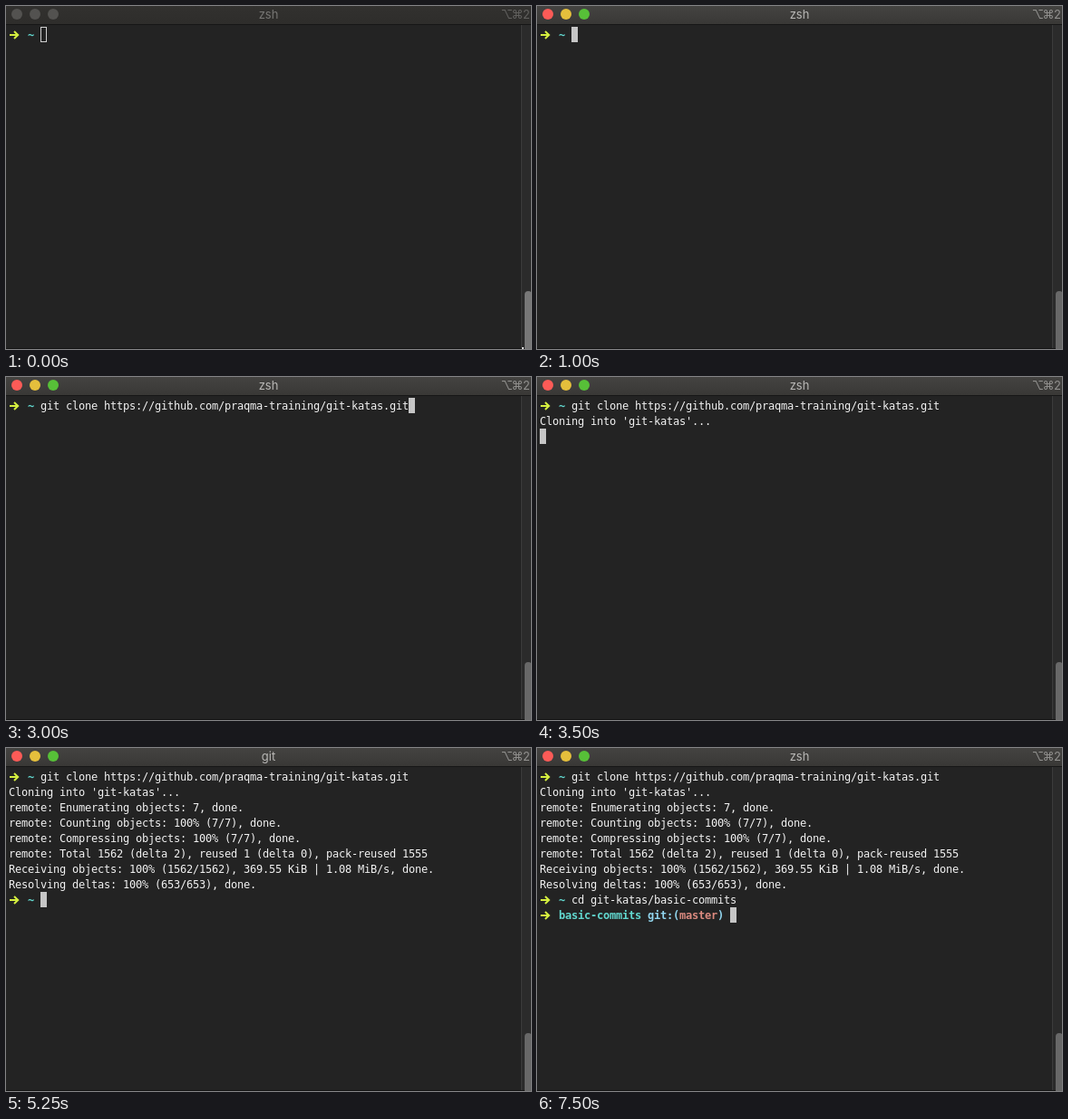
An HTML page with a canvas that plays this animation: 579 by 379 pixels, repeating every 8 s.

```html
<!DOCTYPE html>
<html lang="en">
<head>
<meta charset="utf-8">
<title>Terminal</title>
<style>
html, body { margin: 0; width: 579px; height: 379px; overflow: hidden; background: #232323; }
canvas { display: block; }
</style>
</head>
<body>
<canvas id="stage" width="579" height="379"></canvas>
<script>
const ctx = document.getElementById('stage').getContext('2d');
const LOOP = 8000, CELL = 7, ROW = 17, LEFT = 3, TOP = 23;
const BG = '#232323', TEXT = '#f2f2f2', CYAN = '#62d9d0', BLUE = '#91d5ee', RED = '#dc8b80', LIME = '#d5ef3f';
const MONO = '"DejaVu Sans Mono", monospace';
const SANS = 'Inter, "DejaVu Sans", sans-serif';

// [time, characters typed so far]
const clone = 'git clone https://github.com/praqma-training/git-katas.git';
const cloneKeys = [[1500, 1], [1750, 3], [2000, 4], [2500, 5], [3000, clone.length]];
const cd = 'cd git-katas/basic-commits';
const cdKeys = [[6000, 2], [6250, 3], [6500, 5], [7000, cd.length]];

// [time, row, text]; a later entry replaces the same row
const output = [
  [3500, 1, "Cloning into 'git-katas'..."],
  [4750, 2, 'remote: Enumerating objects: 7, done.'],
  [4750, 3, 'remote: Counting objects: 100% (7/7), done.'],
  [4750, 4, 'remote: Compressing objects: 100% (7/7), done.'],
  [4750, 5, 'Receiving objects:   3% (47/1562)'],
  [5000, 5, 'Receiving objects:  78% (1219/1562)'],
  [5250, 5, 'remote: Total 1562 (delta 2), reused 1 (delta 0), pack-reused 1555'],
  [5250, 6, 'Receiving objects: 100% (1562/1562), 369.55 KiB | 1.08 MiB/s, done.'],
  [5250, 7, 'Resolving deltas: 100% (653/653), done.']
];

function rect(x, y, w, h, color) {
  ctx.fillStyle = color;
  ctx.fillRect(x, y, w, h);
}

function write(col, row, text, color = TEXT, weight = 'normal') {
  ctx.font = `${weight} 12px ${MONO}`;
  ctx.textAlign = 'left';
  ctx.fillStyle = color;
  [...text].forEach((c, i) => ctx.fillText(c, LEFT + (col + i) * CELL, TOP + row * ROW + 13));
}

function arrow(row) {
  const y = TEXT && TOP + row * ROW + 9;
  ctx.strokeStyle = LIME;
  ctx.lineWidth = 2;
  ctx.beginPath();
  ctx.moveTo(4, y);
  ctx.lineTo(13, y);
  ctx.moveTo(9, y - 4);
  ctx.lineTo(13.2, y);
  ctx.lineTo(9, y + 4);
  ctx.stroke();
}

function typed(text, keys, t) {
  const step = keys.filter(k => k[0] <= t).pop();
  return step ? text.slice(0, step[1]) : '';
}

function prompt(row, text) {
  arrow(row);
  write(3, row, '~', CYAN, 'bold');
  write(5, row, text);
  return [5 + text.length, row];
}

function chrome(t) {
  const active = t >= 250;
  const bar = ctx.createLinearGradient(0, 0, 0, 20);
  bar.addColorStop(0, active ? '#444341' : '#32312f');
  bar.addColorStop(1, active ? '#393836' : '#2e2d2b');
  rect(0, 0, 579, 20, bar);
  rect(0, 20, 579, 1, '#161616');

  ['#fc5b57', '#e5bf3c', '#57c038'].forEach((color, i) => {
    ctx.fillStyle = active ? color : '#535250';
    ctx.beginPath();
    ctx.arc(12 + 20 * i, 9, 6, 0, 7);
    ctx.fill();
  });

  ctx.font = '13px ' + SANS;
  ctx.textAlign = 'center';
  ctx.fillStyle = active ? '#b9b8b6' : '#777674';
  ctx.fillText(t >= 4750 && t < 6250 ? 'git' : 'zsh', 289.5, 14);
  ctx.fillStyle = active ? '#92918f' : '#62615f';
  [...'⌥⌘2'].forEach((c, i) => ctx.fillText(c, [552.5, 564, 574][i], 14));

  rect(568, 21, 11, 358, '#2b2b2b');
  rect(568, 21, 1, 358, '#3c3c3c');
  ctx.fillStyle = t < 500 ? '#777' : t < 1000 ? '#707070' : '#686868';
  ctx.beginPath();
  ctx.roundRect(572, 315, 8, 70, 4);
  ctx.fill();
  rect(0, 378, 572, 1, '#141414');
  if (t < 750) rect(569, 377, 2, 2, '#ddd');
}

function draw(t) {
  rect(0, 0, 579, 379, BG);
  chrome(t);

  let cursor = prompt(0, typed(clone, cloneKeys, t));
  const lines = [];
  for (const [time, row, text] of output) if (time <= t) lines[row] = text;
  lines.forEach((text, row) => write(0, row, text));

  if (t >= 3500) cursor = [0, t < 4750 ? 2 : 5];
  if (t >= 5250) cursor = prompt(8, typed(cd, cdKeys, t));
  if (t >= 7500) {
    arrow(9);
    write(3, 9, 'basic-commits', CYAN, 'bold');
    write(17, 9, 'git:(', BLUE, 'bold');
    write(22, 9, 'master', RED, 'bold');
    write(28, 9, ')', BLUE, 'bold');
    cursor = [30, 9];
  }

  const x = LEFT + cursor[0] * CELL, y = TOP + cursor[1] * ROW;
  if (t < 250) {
    ctx.strokeStyle = '#d0d0d0';
    ctx.lineWidth = 1;
    ctx.strokeRect(x + .5, y + .5, CELL - 1, ROW - 1);
  } else {
    rect(x, y, CELL, ROW, '#c6c6c6');
    if (t >= 4750 && t < 5250) write(0, 5, 'R', '#4d4d4d');
  }
}

function frame() {
  draw(performance.now() % LOOP);
  requestAnimationFrame(frame);
}
frame();
</script>
</body>
</html>
```
